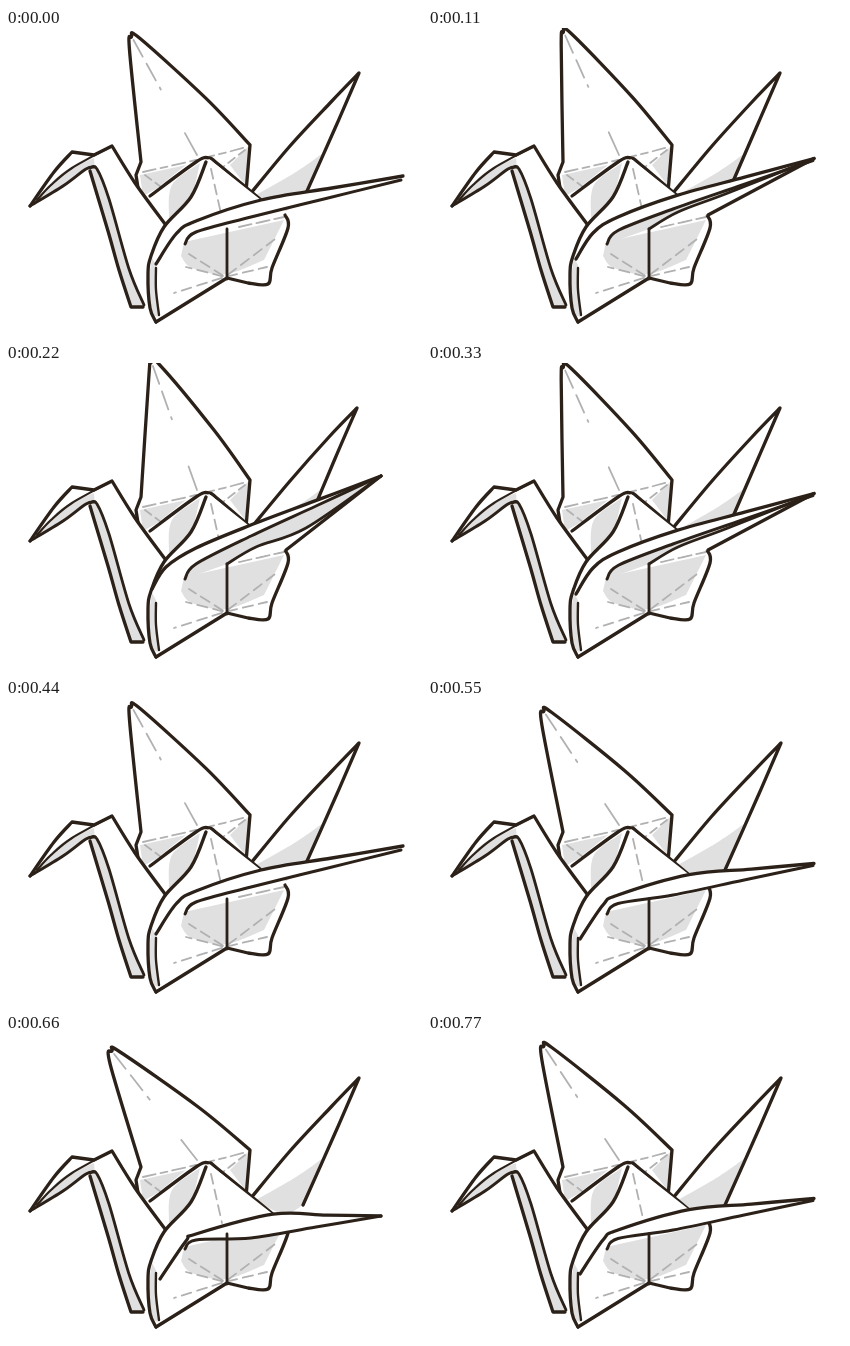
An HTML page with a canvas for the animation above (0.88 s loop, 416x307 px).

```html
<!DOCTYPE html>
<html lang="en">
<head>
<meta charset="utf-8">
<title>Paper crane</title>
<style>
  html, body { margin: 0; width: 100%; height: 100%; overflow: hidden; background: #fff; }
  canvas { display: block; width: 416px; height: 307px; }
</style>
</head>
<body>
<canvas id="stage" width="416" height="307"></canvas>
<script>
const ctx = document.getElementById('stage').getContext('2d');
const INK = '#2b2119', SHADE = '#e0e0e0', CREASE = '#b1b1b1', PAPER = '#fff';
const STEP = 110, STEPS = 8;

const parse = text => text.trim().split(/\s+/).map(p => p.split(',').map(Number));
const reversed = text => text.split(' ').reverse().join(' ');
const between = (a, b, t) => a.map((v, i) => v + (b[i] - v) * t);

// Smooth curve through the points; "|" joins runs at a sharp corner.
function curve(text) {
  const path = new Path2D();
  text.split('|').forEach((run, n) => {
    const p = parse(run);
    path[n ? 'lineTo' : 'moveTo'](...p[0]);
    for (let i = 0; i < p.length - 1; i++) {
      const a = p[i - 1] || p[i], b = p[i], c = p[i + 1], d = p[i + 2] || c;
      path.bezierCurveTo(
        b[0] + (c[0] - a[0]) / 6, b[1] + (c[1] - a[1]) / 6,
        c[0] - (d[0] - b[0]) / 6, c[1] - (d[1] - b[1]) / 6, ...c);
    }
  });
  return path;
}

function fill(text, color = PAPER) {
  ctx.fillStyle = color;
  ctx.fill(curve(text));
}

function ink(text, width = 3.3) {
  ctx.strokeStyle = INK;
  ctx.lineWidth = width;
  ctx.stroke(curve(text));
}

function crease(text, dash = [10, 6]) {
  ctx.strokeStyle = CREASE;
  ctx.lineWidth = 1.8;
  ctx.setLineDash(dash);
  ctx.stroke(curve(text));
  ctx.setLineDash([]);
}

function shaded(outline, shade) {
  fill(outline);
  ctx.save();
  ctx.clip(curve(outline));
  fill(shade, SHADE);
  ctx.restore();
}

// All moving edges follow from the lift, from -2 (lowered) to 2 (raised).
function poseAt(lift) {
  const level = 2 - Math.abs(lift);
  const tip = [375 + 11 * level, 148 - 17.5 * lift];
  const shoulder = [255 - 6 * lift, 172 - 4.6 * lift];
  const elbow = [245, 189 - 8 * lift];
  const lowTip = [tip[0] - level, tip[1] + 2 * level];
  return {
    lift, shoulder,
    wing: [126.5 + 9.7 * lift, 8 - 4.5 * lift],
    tail: [353 - Math.max(0, lift), 45],
    top: `${tip} ${between(tip, shoulder, .5)} ${shoulder} 190,${193 - 4 * lift} ` +
         `${170 - 5 * lift},${206 - lift} ${150 - 2 * lift},${236 - 5 * lift}`,
    low: `${lowTip} ${between(lowTip, elbow, .5)} ${elbow} 190,${204 - 1.5 * lift} 179,216`,
    fold: `${tip} 300,165 250,184 221,201`,
    under: `${tip} 280,187`
  };
}

function drawTail({ tail: [x, y] }) {
  const left = `245,165 284,118 ${x - 28},${y + 29} ${x},${y}`;
  const right = `${x},${y} ${x - 23},${y + 53} 297,172`;
  shaded(`${left}|${right}|270,190`, '324,120 290,144 248,168|290,188');
  ink(`${left}|${right}`);
}

function drawBackWing({ wing }) {
  const [x, y] = wing, corner = [244, 117];
  const [bx, by] = between(wing, corner, .6);
  const outline = `133,166 130,147|135,134 ${x - 3},${y + 14} ${x - 1},${y + 1} ` +
    `${x + 7},${y + 2} ${bx + 3},${by - 3} ${corner}|240,164`;
  fill(outline);
  fill('134,147|180,137|150,161|137,168', SHADE);
  fill(`${corner}|240,158|224,137`, SHADE);
  const along = t => between([x + 1, y + 4], [191, 127], t);
  crease(`${along(0)} ${along(.43)}`, [19, 8]);
  crease(`${along(.81)} ${along(1)}`, []);
  crease('137,144 190,132 241,119', [13, 5, 7, 5]);
  crease('139,147 159,162', [8, 5]);
  crease('239,122 213,142', [8, 5]);
  ink(outline);
}

function drawRidge({ shoulder }) {
  const edge = `144,168 190,134 203,130 212,136 ${shoulder}`;
  shaded(`${edge}|160,196`, '194,135 166,157 163,190|187,166');
  ink(edge);
}

function drawNeck() {
  const outer = '84,143 102,203 113,242 125,279|137,279';
  const inner = '84,140 91,141 103,171 123,241 138,277';
  const back = '106,118 129,155 159,196';
  fill(`${inner}|146,235|${reversed(back)}`);
  fill(`${outer}|${reversed(inner)}`, SHADE);

  const crown = '24,178 48,144 66,124|88,127|106,118';
  const jaw = '89,139 80,141 57,158 24,178';
  shaded(`${crown}|${jaw}`, '24,178 55,146 88,130|89,142|56,159');
  ink(`${crown}|${back}`);
  ink(jaw, 3);
  ink('104,119 66,140 45,157 31,172', 2.2);
  ink(inner, 2.8);
  ink(outer);
}

function drawBody({ top, shoulder }) {
  const left = '200,134 185,169 158,199 145,228 142,246 144,280 150,294';
  const base = '150,294|221,250|242,255 262,256 266,240 282,200 279,187';
  fill(`${left}|${base}|${shoulder}|203,131`);
  fill('178,214|278,192|258,232 220,246 186,240 175,228', SHADE);
  fill('146,230 143,255 146,283 152,289|150,262 150,237', SHADE);
  crease('205,141 216,190');
  const hub = [219, 249];
  for (const end of [[168, 265], [183, 226], [180, 239], [273, 208], [261, 239]]) {
    crease(`${between(hub, end, .06)} ${end}`);
  }
  crease('233,199 278,189', [13, 5]);
  ink(left);
  ink(base);
  ink('150,240 150,262 153,287', 2.4);
}

function drawFrontWing({ lift, top, low, fold, under }) {
  if (lift > 0) {
    fill(`${top}|${reversed(low)}`);
    fill(`${fold}|${reversed(under)}`);
    fill(`${low}|${reversed(fold)}`, SHADE);
    ink(under);
    ink(fold, 2.8);
  } else {
    fill(`${top}|${reversed(low)}`);
  }
  ink('221,201 221,251', 2.8);
  ink(low, 3);
  ink(top);
}

function draw(now) {
  const step = Math.floor(now / STEP) % STEPS;
  const pose = poseAt(Math.round(2 * Math.sin(step / STEPS * 2 * Math.PI)));
  ctx.fillStyle = PAPER;
  ctx.fillRect(0, 0, 416, 307);
  ctx.lineCap = ctx.lineJoin = 'round';
  drawTail(pose);
  drawBackWing(pose);
  drawRidge(pose);
  drawNeck();
  drawBody(pose);
  drawFrontWing(pose);
}

const start = performance.now();
function tick() {
  draw(performance.now() - start);
  requestAnimationFrame(tick);
}
tick();
</script>
</body>
</html>
```
